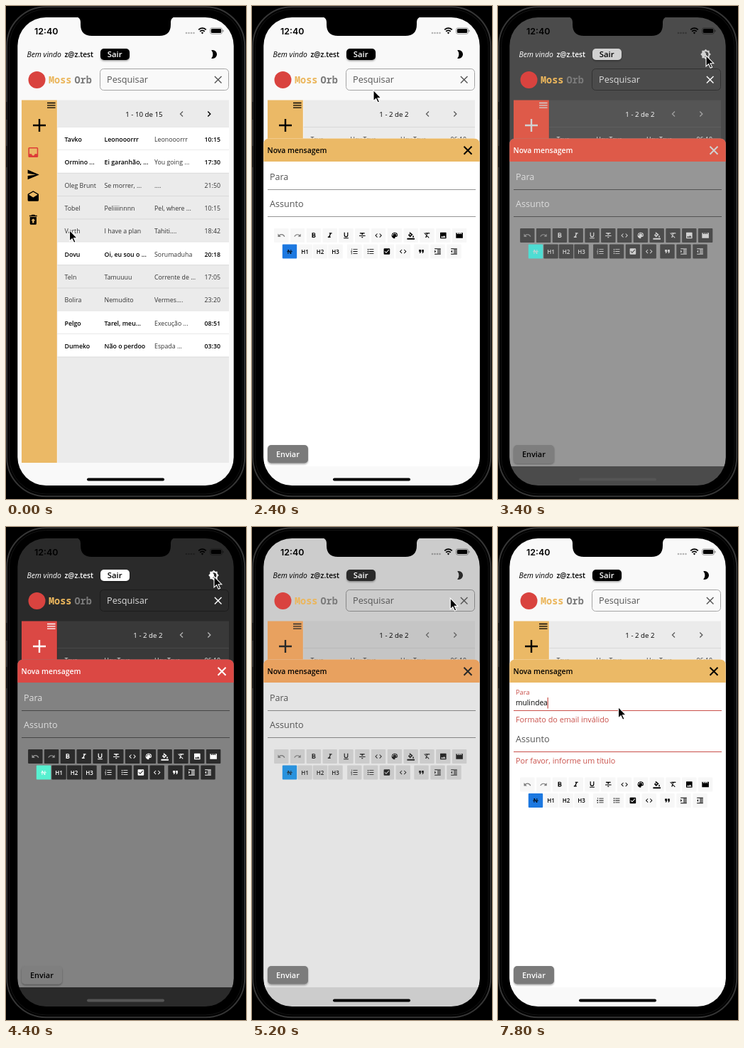
Recreate the animation shown at these times as an HTML page. Size 338 by 694 pixels, loop 8 s.

```html
<!DOCTYPE html>
<html lang="pt">
<head>
<meta charset="utf-8">
<title>Caixa de mensagens</title>
<style>
html, body { margin: 0; width: 100%; height: 100%; overflow: hidden; background: #000; }
svg { display: block; width: 338px; height: 694px; }
text { font-family: "Open Sans", "Noto Sans", sans-serif; white-space: pre; }
.page { fill: var(--page); }
.panel { fill: var(--panel); }
.side { fill: var(--side); }
.dialog { fill: var(--dialog); }
.tool { fill: var(--tool); }
.on { fill: var(--on); }
.send { fill: var(--send); }
.icon { fill: var(--icon); }
.ink { fill: var(--ink); }
.soft { fill: var(--soft); }
.label { fill: var(--label); }
.inv { fill: var(--inv); }
.err { fill: #c9504a; }
.line { stroke: var(--line); }
.thin { fill: none; stroke: var(--icon); }
.b { font-weight: 600; }
</style>
</head>
<body>
<svg id="stage" viewBox="0 0 338 694"></svg>
<script>
const LOOP = 8000, STEP = 200;
const stage = document.getElementById('stage');

const icons = {
  undo: 'M12.5 8Q8.5 8 5.6 10.6L2 7v9h9l-3.6-3.6Q9.6 10.5 12.5 10.5q5.5 .2 7.6 5.5l2.4-.8Q20 8.3 12.5 8z',
  bold: 'M7 4h6a4 4 0 0 1 2.5 7a3.7 3.7 0 0 1-1.5 7H7zM10 6.5v3h3.2a1.5 1.5 0 0 0 0-3zM10 12.5v3h3.5a1.5 1.5 0 0 0 0-3z',
  italic: 'M10 4v3h2.2l-3.4 8H6v3h8v-3h-2.2l3.4-8H18V4z',
  under: 'M6 3v8a6 6 0 0 0 12 0V3h-2.5v8a3.5 3.5 0 0 1-7 0V3zM5 19v2h14v-2z',
  strike: 'M10 16h4v3h-4zM5 4v3h5v3h4V7h5V4zM3 12h18v2H3z',
  code: 'M9.4 16.6L4.8 12l4.6-4.6L8 6l-6 6 6 6zM14.6 16.6l4.6-4.6-4.6-4.6L16 6l6 6-6 6z',
  palette: 'M12 3a9 9 0 0 0 0 18q2-.5 1-2.5q-.5-2.5 2-2.5h1q5 0 5-5q-.6-8-9-8zM5 9h3v3H5zM8 5h3v3H8zM13 5h3v3h-3zM16 9h3v3h-3z',
  fill: 'M9 2L7.5 3.5 9.5 5.5 4 11l6 6 8-7.5zM7 11l3.5-3.5L14 11zM19 12q-4 5 0 6q4-1 0-6zM1 20h22v4H1z',
  clear: 'M3 5l14 15 1.5-1.5L4.5 4zM7 4v1.5L9 7h2l-.5 1.5 2 2L14 7h6V4zM9.5 12L7 18h3l1.5-4z',
  image: 'M3 4q0-1 1-1h16q1 0 1 1v16q0 1-1 1H4q-1 0-1-1zM5 18h14l-4.5-6-3.5 4.5-2.5-3z',
  film: 'M2 4h2l2 4h3L7 4h2l2 4h3l-2-4h2l2 4h3l-2-4h5v16H2z',
  ol: 'M8 5h13v2H8zM8 11h13v2H8zM8 17h13v2H8zM3 4h2v4H4V5H3zM2 10h3v1l-2 2h2v1H2zM2 16h3v4H2v-1h2v-2H2z',
  ul: 'M8 5h13v2H8zM8 11h13v2H8zM8 17h13v2H8zM3 4.5h3v3H3zM3 10.5h3v3H3zM3 16.5h3v3H3z',
  check: 'M3 5q0-2 2-2h14q2 0 2 2v14q0 2-2 2H5q-2 0-2-2zM10 17l9-9-1.5-1.5L10 14.2l-3.5-3.5L5 12z',
  quote: 'M6 17h3l2-4V7H5v6h3zM14 17h3l2-4V7h-6v6h3z',
  indent: 'M3 3h18v2H3zM11 7h10v2H11zM11 11h10v2H11zM11 15h10v2H11zM3 19h18v2H3zM3 8v8l4-4z',
  outdent: 'M3 3h18v2H3zM11 7h10v2H11zM11 11h10v2H11zM11 15h10v2H11zM3 19h18v2H3zM7 8v8l-4-4z',
  inbox: 'M3 5q0-2 2-2h14q2 0 2 2v14q0 2-2 2H5q-2 0-2-2zM5 5v10h4q.5 3 3 3t3-3h4V5z',
  plane: 'M2 21l21-9L2 3v7l15 2-15 2z',
  drafts: 'M22 8q0-1-1-1.7L12 1 3 6.3Q2 7 2 8v10q0 2 2 2h16q2 0 2-2zM12 13L3.7 7.8 12 3l8.3 4.8z',
  trash: 'M5 4h3.5l1-1h5l1 1H19v2H5zM6 7h12v12q0 2-2 2H8q-2 0-2-2zM12 10l-4 4h2.5v4h3v-4H16z',
  moon: 'M9 2q-1.5 0-3 .5a14 14 0 0 1 0 19q1.5 .5 3 .5a10 10 0 0 0 0-20z',
  sun: 'M20 8.7V4h-4.7L12 .7 8.7 4H4v4.7L.7 12 4 15.3V20h4.7l3.3 3.3 3.3-3.3H20v-4.7l3.3-3.3zM12 18q-1.3 0-2.5-.6a6 6 0 0 0 0-10.8Q10.7 6 12 6a6 6 0 0 1 0 12z'
};

const rect = (x, y, w, h, attr = '') => `<rect x="${x}" y="${y}" width="${w}" height="${h}" ${attr}/>`;
const text = (x, y, size, str, cls = 'ink', attr = '') =>
  `<text x="${x}" y="${y}" font-size="${size}" class="${cls}" ${attr}>${str}</text>`;
const path = (d, attr = 'class="thin"') => `<path d="${d}" ${attr}/>`;
const icon = (name, x, y, size, attr = 'class="icon"', flip = 1) =>
  `<path d="${icons[name]}" fill-rule="evenodd" ${attr} transform="translate(${x} ${y}) scale(${size / 24 * flip} ${size / 24}) translate(-12 -12)"/>`;
const cross = (x, y, r, attr) => path(`M${x - r} ${y - r}l${2 * r} ${2 * r}m0 ${-2 * r}l${-2 * r} ${2 * r}`, attr);

const inbox = [
  [1, 'Tavko', 'Leonooorrr', 'Leonooorrr', '10:15'],
  [1, 'Ormino ...', 'Ei garanhão, ...', 'You going ...', '17:30'],
  [0, 'Oleg Brunt', 'Se morrer, ...', '....', '21:50'],
  [0, 'Tobel', 'Peliiiinnnn', 'Pel, where ...', '10:15'],
  [0, 'Varth', 'I have a plan', 'Tahiti....', '18:42'],
  [1, 'Dovu', 'Oi, eu sou o ...', 'Sorumaduha', '20:18'],
  [0, 'Teln', 'Tamuuuu', 'Corrente de ...', '17:05'],
  [0, 'Bolira', 'Nemudito', 'Vermes....', '23:20'],
  [1, 'Pelgo', 'Tarel, meu...', 'Execução ...', '08:51'],
  [1, 'Dumeko', 'Não o perdoo', 'Espada ...', '03:30']
];
const sent = [
  [0, 'Tave', 'Hey Tave', 'Hey Tave, ...', '06:10'],
  [0, 'Seu moço', 'SOS', 'Oh! Oh! Seu ...', '23:59']
];
const cols = [82.5, 138.5, 209, 279.5];

function list(rows, range) {
  const body = rows.map(([fresh, ...cells], i) => {
    const y = 170.6 + 32.35 * i;
    return (fresh ? rect(72.5, y, 241.5, 32.35, 'fill="#fff"') : '') +
      cells.map((c, k) => text(cols[k], y + 20.2, 8.8, c, fresh && k !== 2 ? 'ink b' : 'soft')).join('') +
      path(`M72.5 ${y + 32.3}h241.5`, 'class="line" stroke-width=".8"');
  }).join('');
  return text(220.5, 155.7, 9.7, range, 'ink', 'text-anchor="end"') +
    path('M72.5 170.5h241.5', 'class="line" stroke-width=".8"') + body;
}

function toolbar() {
  const button = (x, y, name) => {
    const on = name === 'N';
    const label = /^[NH]/.test(name);
    const mark = label ? text(x, y + 3, 8, name, 'icon b', 'text-anchor="middle"')
      : name === 'redo' ? icon('undo', x, y, 11, 'class="icon" opacity=".5"', -1)
      : icon(name, x, y, 11.5, `class="icon" opacity="${name === 'undo' ? .5 : 1}"`);
    return rect(x - 10.2, y - 10, 20.4, 20, `rx="1" class="${on ? 'on' : 'tool'}"`) + mark +
      (on ? path(`M${x - 4} ${y + .2}h8`, 'class="thin" stroke-width=".7"') : '');
  };
  const top = 'undo redo bold italic under strike code palette fill clear image film'.split(' ');
  const low = [['N H1 H2 H3', 53, 21.5], ['ol ul check code', 144.3, 22.8], ['quote indent outdent', 238.5, 23]];
  return top.map((n, i) => button(41.3 + 22.8 * i, 323, n)).join('') +
    low.map(([names, x, gap]) => names.split(' ').map((n, i) => button(x + gap * i, 345.5, n)).join('')).join('');
}

const statusBar = text(40, 39.6, 12.4, '12:40', '', 'font-weight="600" style="font-family:Inter,sans-serif"') +
  [254, 257.5, 261, 264.5].map(x => `<circle cx="${x}" cy="38" r="1.3" opacity=".28"/>`).join('') +
  path('M271.2 33.4q5.3-4.5 10.6 0M273.2 35.8q3.3-2.8 6.6 0', 'fill="none" stroke="#000" stroke-width="1.8"') +
  path('M274.8 37.5q1.7-1.4 3.4 0l-1.7 2z', '') +
  rect(287.5, 30.8, 17, 8.6, 'rx="2.6" fill="none" stroke="#000" stroke-width=".8" opacity=".45"') +
  rect(288.8, 32.1, 14.4, 6, 'rx="1.5"') + rect(305.3, 33.6, 1.2, 3, 'rx=".6" opacity=".45"');

const header = text(29.5, 71.8, 10.4, 'Bem vindo', 'ink', 'font-style="italic"') +
  text(82.5, 71.8, 10.2, 'z@z.test', 'ink b') +
  rect(133, 60, 41, 16, 'rx="5" class="icon" filter="url(#shade)"') +
  text(153.2, 72, 11.3, 'Sair', 'inv b', 'text-anchor="middle"') +
  icon('moon', 292.8, 68, 14.5, 'id="moon" class="icon"') + icon('sun', 292.5, 68, 15.5, 'id="sun" class="icon"') +
  '<circle cx="43.5" cy="104" r="12" fill="#d9433f"/>' +
  `<text x="60" y="108.5" font-size="13.5" font-weight="800" word-spacing="-4" style="font-family:'Noto Sans Mono',monospace" fill="#ebb65c">Moss<tspan fill="#7b7b7b"> Orb</tspan></text>` +
  rect(132.5, 88.5, 181, 30, 'rx="5" fill="none" stroke="var(--field)"') +
  text(142, 107.6, 12.7, 'Pesquisar', 'label') +
  cross(298.7, 103.8, 4.8, 'fill="none" stroke="var(--wipe)" stroke-width="1.4"');

const sidebar = rect(22, 132.5, 49.8, 510.5, 'class="side"') +
  path('M58 136.5h11.5M58 139.8h11.5M58 143.1h11.5', 'class="thin" stroke-width="1.3"') +
  path('M38 168h18M47 159v18', 'class="thin" stroke-width="2.4"') +
  icon('inbox', 38.3, 206, 18.5, 'id="in"') + icon('plane', 38.3, 237.4, 18.5, 'id="out"') +
  icon('drafts', 38.3, 268.7, 18.5) + icon('trash', 38.3, 300.8, 18.5);

const compose = path('M16 648V195.5q0-9 9-9h287q9 0 9 9v452.500z', 'class="dialog"') +
  path('M16 219V195.5q0-9 9-9h287q9 0 9 9v23.500z', 'class="side"') +
  text(21.5, 206.8, 10.4, 'Nova mensagem', 'ink b') +
  cross(304, 203.3, 5.5, 'class="thin" stroke-width="2"') +
  text(25, 245.3, 12.5, 'Para', 'label', 'id="to"') +
  text(25, 251.2, 10.2, '', 'ink', 'id="typed"') +
  rect(24.8, 240, 1.2, 15.5, 'id="caret" class="err"') +
  path('M22 258.5h293', 'id="line1"') +
  text(25, 275.3, 10.8, 'Formato do email inválido', 'err', 'id="err1"') +
  `<g id="subject">${text(25, 283.3, 12.6, 'Assunto', 'label')}${path('M22 296.5h293', 'id="line2"')}</g>` +
  text(25, 333, 10.8, 'Por favor, informe um título', 'err', 'id="err2"') +
  `<g id="tools">${toolbar()}</g>` +
  rect(22, 618, 57, 25.5, 'rx="5" class="send" filter="url(#shade)"') +
  text(50.4, 634.8, 10.9, 'Enviar', 'inv b', 'text-anchor="middle"');

stage.innerHTML = `<defs>
  <clipPath id="screen">${rect(16.3, 16, 304.4, 659, 'rx="40"')}</clipPath>
  <clipPath id="body">${rect(16, 16, 305, 632)}</clipPath>
  <filter id="shade" x="-20%" y="-30%" width="140%" height="180%"><feDropShadow dx="0" dy="1.5" stdDeviation="1.2" flood-opacity=".35"/></filter></defs>` +
  rect(0, 0, 338, 694) +
  rect(1.2, 1.2, 335, 689, 'rx="55" fill="none" stroke="#363636" stroke-width="2"') +
  rect(4.5, 4.5, 328.5, 682.5, 'rx="52" fill="none" stroke="#141414"') +
  rect(0, 135, 1.5, 25, 'fill="#111"') + rect(0, 197, 1.5, 30, 'fill="#111"') +
  `<g clip-path="url(#screen)">${rect(16, 16, 305, 659, 'class="page"')}${statusBar}${header}
  ${rect(72.5, 132.5, 241.5, 510.5, 'class="panel"')}
  <g id="listIn">${list(inbox, '1 - 10 de 15')}</g><g id="listOut">${list(sent, '1 - 2 de 2')}</g>
  ${path('M249 148.5l-3.5 3.5 3.5 3.5', 'class="thin" stroke-width="1.3" opacity=".6"')}
  ${path('M284.3 148.5l3.5 3.5-3.5 3.5', 'id="next" class="thin" stroke-width="1.4"')}
  ${sidebar}<g clip-path="url(#body)"><g id="compose">${compose}</g></g>
  ${rect(114, 664.5, 109, 4, 'rx="2" id="home"')}
  ${path('M98 15h141q-7 1-7 8v3q0 16-16 16h-95q-16 0-16-16v-3q0-7-7-8z', 'fill="#000"')}</g>` +
  path('M0 0v15.5l3.6-3.3 2.6 5.6 2.4-1.1-2.6-5.5h4.7z', 'id="cursor" fill="#000" stroke="#fff" stroke-width="1.1"');

const el = {};
stage.querySelectorAll('[id]').forEach(e => el[e.id] = e);
const show = (name, on) => el[name].style.display = on ? '' : 'none';
const shift = (name, x, y) => el[name].setAttribute('transform', `translate(${x} ${y})`);
const css = (name, value) => stage.style.setProperty('--' + name, value);

// light and dark ends of each surface
const surfaces = {
  page: [[249, 249, 249], [42, 42, 42]],
  panel: [[235, 235, 235], [57, 57, 57]],
  side: [[235, 185, 102], [219, 72, 68]],
  dialog: [[255, 255, 255], [130, 130, 130]],
  tool: [[247, 247, 247], [43, 43, 43]],
  on: [[28, 120, 224], [88, 240, 208]],
  send: [[122, 122, 122], [127, 127, 127]],
  line: [[212, 212, 212], [76, 76, 76]],
  field: [[165, 165, 165], [28, 28, 28]],
  rule: [[150, 150, 150], [70, 70, 70]]
};
const mix = ([a, b], p) => `rgb(${a.map((v, i) => Math.round(v + (b[i] - v) * p))})`;

// enter and leave: darkness on the first step of each fade
function darkness(t, enter, leave) {
  if (t < 3200 || t >= 5600) return 0;
  if (t < 4200) return 1 - (1 - enter) * .4 ** ((t - 3200) / 200);
  return t < 5000 ? 1 : leave * .4 ** ((t - 5000) / 200);
}

const moves = [
  [0, 89.5, 315.5], [600, 32, 237], [1000, 32, 237], [1600, 49, 167], [2000, 49, 167],
  [2800, 293, 69.5], [5000, 293, 69.5], [5600, 240, 188], [5800, 240, 188], [6200, 169.5, 253.5], [LOOP, 169.5, 253.5]
];
function pointer(t) {
  const i = moves.findIndex(m => m[0] > t);
  const [t0, x0, y0] = moves[i - 1], [t1, x1, y1] = moves[i];
  const u = (t - t0) / (t1 - t0), e = u * u * (3 - 2 * u);
  return [x0 + (x1 - x0) * e, y0 + (y1 - y0) * e];
}

const address = 'mulindea';

function render(t) {
  const p = darkness(t, .6, .54);
  for (const name in surfaces) css(name, mix(surfaces[name], p));
  css('icon', mix([[0, 0, 0], [255, 255, 255]], darkness(t, .55, .4)));

  const night = t >= 3400 && t < 5200;
  css('ink', night ? '#fff' : '#000');
  css('soft', night ? '#eee' : '#333');
  css('label', night ? '#ddd' : t >= 3200 && t < 3400 ? '#333' : '#555');
  css('inv', night ? '#000' : '#fff');
  css('wipe', t >= 3200 && t < 5200 ? '#fff' : '#555');
  el.home.setAttribute('fill', t >= 3400 && t < 5000 ? '#555' : '#000');
  const sun = t >= 3200 && t < 5000;
  show('sun', sun);
  show('moon', !sun);

  const out = t >= 1000;
  show('listIn', !out);
  show('listOut', out);
  el.in.style.fill = out ? 'var(--icon)' : '#dd3b37';
  el.out.style.fill = out ? '#dd3b37' : 'var(--icon)';
  el.next.style.opacity = out ? .6 : 1;

  show('compose', t >= 2000);
  shift('compose', 0, 461 * Math.max(0, 1 - (t - 1800) / 400) ** 2);

  const focus = t >= 6400, bad = t >= 6800;
  el.to.setAttribute('y', focus ? 235.8 : 245.3);
  el.to.setAttribute('font-size', focus ? 9.3 : 12.5);
  el.to.style.fill = focus ? '#c9504a' : '';
  const count = Math.max(0, Math.round((t - 6400) / 1400 * address.length));
  el.typed.textContent = address.slice(0, count);
  show('caret', focus);
  shift('caret', count ? el.typed.getComputedTextLength() : 0, 0);
  el.line1.style.stroke = focus ? '#c9504a' : 'var(--rule)';
  el.line2.style.stroke = bad ? '#c9504a' : 'var(--rule)';
  show('err1', bad);
  show('err2', bad);
  shift('subject', 0, bad ? 20 : 0);
  shift('tools', 0, bad ? 39.5 : 0);

  shift('cursor', ...pointer(t));
}

let last = -1;
const begin = performance.now();
function tick() {
  const t = Math.floor((performance.now() - begin) % LOOP / STEP) * STEP;
  if (t !== last) render(last = t);
  requestAnimationFrame(tick);
}
tick();
</script>
</body>
</html>
```
